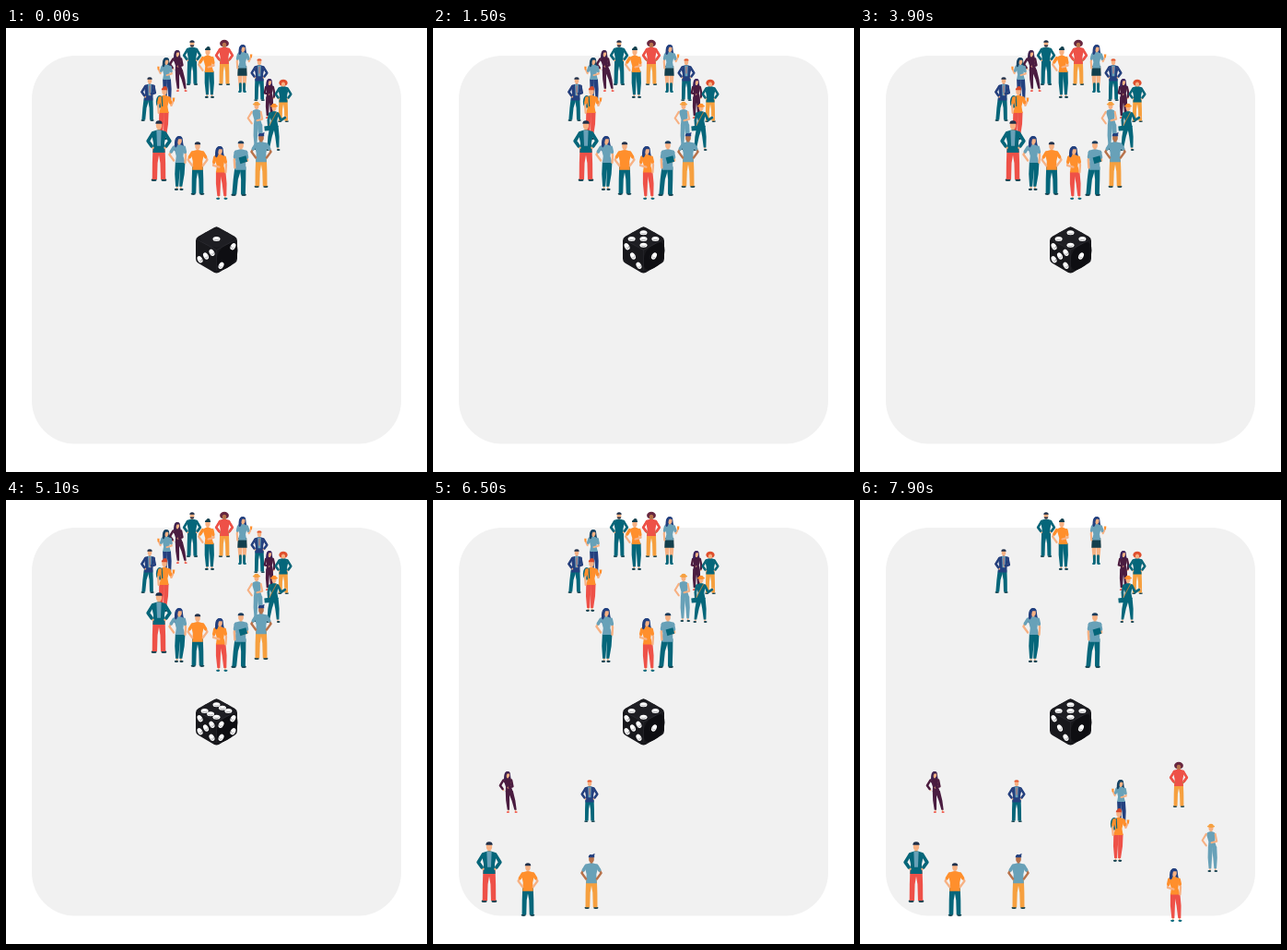
Animation, 457 px wide and 481 px high, one loop 8 s. Source, as an HTML page with a canvas:

```html
<!DOCTYPE html>
<html lang="en">
<head>
<meta charset="utf-8">
<title>Dice and groups</title>
<style>
html, body { margin: 0; width: 100%; height: 100%; overflow: hidden; background: #fff; }
canvas { display: block; }
</style>
</head>
<body>
<canvas id="stage" width="457" height="481"></canvas>
<script>
const ctx = document.getElementById('stage').getContext('2d');

const TEAL = '#05667a', DARK = '#123f4d', BLUE = '#68a1b8', NAVY = '#23407f',
      ORANGE = '#ff8f2c', RED = '#ee5148', YELLOW = '#f6a03f', PURPLE = '#4a1c40',
      INK = '#20304a', SKIN = '#f7b183', BROWN = '#b8724a';

// x: head centre, y: top of the head, h: height; the rest is in hundredths of h
const people = [
  { x: 202, y: 13, h: 49, top: TEAL, legs: TEAL, hair: INK, beard: 1, arms: ['hip', 'hip'], long: 1 },
  { x: 237, y: 13, h: 49, top: RED, legs: YELLOW, hair: '#67263f', style: 'afro', skin: BROWN, arms: ['hip', 'hip'], long: 1, group: 2 },
  { x: 186, y: 24, h: 45, top: PURPLE, legs: PURPLE, hair: '#40234f', style: 'long', arms: ['hip', 'front'], long: 1, feet: [2, 19], sway: 4, shoe: RED, slim: 1, group: 1 },
  { x: 257, y: 18, h: 52, top: BLUE, legs: SKIN, skirt: DARK, hair: NAVY, style: 'long', arms: ['down', 'up'], cup: 1, feet: [-5, 3], sway: -1, shoe: TEAL, boots: 1, slim: 1 },
  { x: 219, y: 21, h: 55, top: ORANGE, legs: TEAL, hair: DARK, style: 'bun', arms: ['hip', 'front'], feet: [-1, 8], sway: 3, slim: 1 },
  { x: 275, y: 33, h: 46, top: NAVY, legs: TEAL, shirt: BLUE, hair: '#e4572e', arms: ['hip', 'hip'], long: 1, group: 1 },
  { x: 174, y: 32, h: 49, top: BLUE, legs: NAVY, hair: '#174363', style: 'long', arms: ['up', 'front'], cup: -1, feet: [-1, 8], sway: 1, slim: 1, group: 2 },
  { x: 286, y: 55, h: 43, top: PURPLE, legs: PURPLE, hair: '#3c235c', style: 'long', arms: ['front', 'down'], long: 1, feet: [-5, 5], shoe: RED, slim: 1 },
  { x: 156, y: 53, h: 48, top: NAVY, legs: TEAL, shirt: BLUE, hair: INK, arms: ['hip', 'front'], long: 1, feet: [-14, 4], sway: -3 },
  { x: 301, y: 56, h: 46, top: TEAL, legs: YELLOW, hair: '#df4e2c', style: 'afro', arms: ['hip', 'hip'], long: 1 },
  { x: 172, y: 64, h: 57, top: ORANGE, legs: RED, hair: '#d94a2b', style: 'bun', pack: 1, arms: ['down', 'up'], cup: 1, feet: [-6, 1], sway: -1, slim: 1, group: 2 },
  { x: 272, y: 80, h: 52, top: BLUE, legs: BLUE, hair: YELLOW, style: 'hat', arms: ['hip', 'front'], bare: 1, feet: [-2, 9], sway: 3, slim: 1, group: 2 },
  { x: 291, y: 82, h: 51, top: TEAL, legs: TEAL, hair: ORANGE, style: 'hat', bag: 1, arms: ['down', 'reach'], long: 1, feet: [-12, 8], slim: 1 },
  { x: 166, y: 100, h: 66, top: TEAL, legs: RED, shirt: BLUE, hair: INK, arms: ['hip', 'hip'], long: 1, group: 1 },
  { x: 277, y: 114, h: 59, top: BLUE, legs: YELLOW, hair: NAVY, style: 'wrap', skin: BROWN, arms: ['hip', 'hip'], group: 1 },
  { x: 188, y: 117, h: 59, top: BLUE, legs: TEAL, hair: NAVY, style: 'long', arms: ['hip', 'down'], feet: [-4, 3], sway: 2, slim: 1 },
  { x: 208, y: 123, h: 58, top: ORANGE, legs: TEAL, hair: INK, arms: ['hip', 'hip'], group: 1 },
  { x: 255, y: 122, h: 60, top: BLUE, legs: TEAL, hair: '#183b5b', folder: 1, arms: ['down', 'front'], feet: [-12, 4], sway: -1 },
  { x: 232, y: 128, h: 58, top: ORANGE, legs: RED, hair: NAVY, style: 'long', arms: ['front', 'down'], feet: [-2, 10], sway: 2, slim: 1, shoe: TEAL, group: 2 }
];

const armPose = {
  hip: [10, 21, 18, 34, 10, 45],
  down: [9, 21, 12, 35, 11, 49],
  up: [9, 21, 13, 35, 17, 26],
  front: [9, 21, 12, 36, 1, 39],
  reach: [8, 21, 15, 35, 26, 28]
};
const shift = { 1: [-105, 270], 2: [109, 271] };

function trace(c, pts) {
  c.beginPath();
  for (let i = 0; i < pts.length; i += 2) c.lineTo(pts[i], pts[i + 1]);
}
function poly(c, color, pts) {
  trace(c, pts);
  c.fillStyle = color;
  c.fill();
}
// closed shape through the midpoints of its corners
function soft(c, color, pts) {
  const n = pts.length;
  const mid = i => (pts[i % n] + pts[(i + 2) % n]) / 2;
  c.beginPath();
  c.moveTo(mid(0), mid(1));
  for (let i = 2; i <= n; i += 2) c.quadraticCurveTo(pts[i % n], pts[(i + 1) % n], mid(i), mid(i + 1));
  c.fillStyle = color;
  c.fill();
}
function oval(c, color, x, y, rx, ry, turn = 0, from = 0, to = 2 * Math.PI) {
  c.fillStyle = color;
  c.beginPath();
  c.ellipse(x, y, rx, ry, turn, from, to);
  c.fill();
}
function line(c, color, width, pts) {
  trace(c, pts);
  c.strokeStyle = color;
  c.lineWidth = width;
  c.stroke();
}

function drawArm(c, p, pose, side) {
  const [ax, ay, bx, by, ex, ey] = armPose[pose].map((v, i) => i % 2 ? v : v * side);
  line(c, p.skin || SKIN, 4, [ax, ay, bx, by, ex, ey]);
  if (p.long) line(c, p.top, 5.5, [ax, ay, bx, by, bx + (ex - bx) * .75, by + (ey - by) * .75]);
  else if (!p.bare) line(c, p.top, 6, [ax, ay, ax + (bx - ax) * .6, ay + (by - ay) * .6]);
}

function drawHead(c, p) {
  const { hair, style, skin = SKIN } = p;
  if (style === 'afro') {
    oval(c, hair, 0, 7.5, 10, 8);
    oval(c, skin, 0, 11, 4.6, 5.5);
    return;
  }
  oval(c, skin, 0, 8.5, 4.8, 6.3);
  if (p.beard) oval(c, hair, 0, 11, 4.6, 4.2, 0, 0, Math.PI);
  if (style === 'hat') {
    oval(c, hair, 0, 5, 8, 2.3);
    oval(c, hair, 0, 3.5, 5.2, 3.8);
    return;
  }
  oval(c, hair, 0, 5.5, 5.6, 5.2, 0, Math.PI, 2 * Math.PI);
  if (style === 'long') soft(c, hair, [3, 1, -1, 4, -3, 10, -3, 20, -9, 22, -8, 2]);
  if (style === 'bun') oval(c, hair, 1, 1.2, 3.6, 3);
  if (style === 'wrap') poly(c, hair, [-5, 4, -3, 0, 1, 1, 6, -2, 5, 5]);
}

// one leg from the hip to the ankle, wide at the thigh
function drawLeg(c, p, side, hip, foot) {
  const sway = p.sway || 0, shoe = p.shoe || DARK;
  const cuff = p.slim ? 2.6 : 4, ankle = p.slim ? 93 : 97;
  const knee = (sway + side * hip * .5 + foot) / 2;
  line(c, p.skin || SKIN, 2.5, [foot, 90, foot, 97]);
  oval(c, shoe, foot + side * 1.2, 98, p.slim ? 3.6 : 4.6, 2);
  poly(c, p.legs, [
    sway + side * hip, 47, knee + side * 4.8, 70, foot + side * cuff, ankle,
    foot - side * cuff, ankle, knee - side * 3.8, 70, sway - side * .4, 55, sway - side * .4, 47
  ]);
  if (p.boots) line(c, shoe, 5.5, [foot, 82, foot, 96]);
}

function drawPerson(c, p) {
  const [fl, fr] = p.feet || [-7, 7];
  const sway = p.sway || 0;
  const shoulder = p.slim ? 9.5 : 12.5, waist = p.slim ? 6.5 : 9, hip = p.slim ? 9 : 10;
  c.lineJoin = c.lineCap = 'round';
  if (p.pack) oval(c, TEAL, -9, 28, 7, 12);
  if (p.style === 'long') soft(c, p.hair, [-6, 0, 6, 0, 7, 14, 10, 24, 3, 29, -6, 29, -12, 24, -7, 14]);

  drawLeg(c, p, 1, hip, fr);
  drawLeg(c, p, -1, hip, fl);
  if (p.skirt) poly(c, p.skirt, [sway - hip, 44, sway + hip, 44, sway + hip + 1, 65, sway - hip - 1, 65]);

  line(c, p.skin || SKIN, 4.5, [0, 12, 0, 19]);
  const hem = p.slim ? 49 : 53;
  poly(c, p.top, [
    -3, 16, 3, 16, shoulder - 2, 18, shoulder, 21, sway / 2 + waist, 37, sway + hip, hem,
    sway - hip, hem, sway / 2 - waist, 37, -shoulder, 21, 2 - shoulder, 18
  ]);
  if (p.shirt) {
    poly(c, p.shirt, [-4, 16.5, 4, 16.5, 3, 42, -3, 42]);
    if (p.top === NAVY) line(c, RED, 1.5, [0, 20, 0, 35]);
  }
  if (p.pack) line(c, TEAL, 2, [-5, 18, -4, 36]);
  p.arms.forEach((pose, i) => drawArm(c, p, pose, i ? 1 : -1));
  if (p.folder) poly(c, TEAL, [-4, 31, 9, 27, 12, 38, -1, 42]);
  if (p.bag) {
    line(c, ORANGE, 1.3, [5, 18, -11, 48]);
    poly(c, TEAL, [-21, 48, -7, 46, -6, 57, -20, 58]);
  }
  if (p.cup) poly(c, ORANGE, [p.cup * 15, 20, p.cup * 20, 20, p.cup * 19, 27, p.cup * 16, 27]);
  drawHead(c, p);
}

const PAD = 30;
for (const p of people) {
  p.sprite = document.createElement('canvas');
  p.sprite.width = 2 * PAD;
  p.sprite.height = p.h + 10;
  const c = p.sprite.getContext('2d');
  c.translate(PAD, 4);
  c.scale(p.h / 100, p.h / 100);
  drawPerson(c, p);
}

// die faces: [top, left, right]
const A = .22, M = .5, Z = .78;
const spots = {
  1: [[M, M]],
  2: [[Z, A], [A, Z]],
  3: [[A, A], [M, M], [Z, Z]],
  4: [[A, A], [A, Z], [Z, A], [Z, Z]],
  5: [[A, A], [A, Z], [M, M], [Z, A], [Z, Z]],
  6: [[A, A], [M, A], [Z, A], [A, Z], [M, Z], [Z, Z]]
};
const sides = [
  { o: [228.5, 216.5], u: [23, 12], v: [-23, 12], rx: 4, ry: 2.5, turn: 0 },
  { o: [205.5, 228.5], u: [23, 12], v: [0, 25], rx: 2.6, ry: 3.9, turn: -.5 },
  { o: [228.5, 240.5], u: [23, -12], v: [0, 25], rx: 2.6, ry: 3.9, turn: .5 }
];
const ONE = [1, 3, 2], FOUR = [4, 5, 1], FIVE = [5, 3, 1], SIX = [6, 5, 4];

function drawPip(s, u, v) {
  const x = s.o[0] + s.u[0] * u + s.v[0] * v;
  const y = s.o[1] + s.u[1] * u + s.v[1] * v;
  oval(ctx, '#fff', x, y, s.rx, s.ry, s.turn);
  ctx.strokeStyle = '#77777d';
  ctx.lineWidth = .6;
  ctx.beginPath();
  ctx.ellipse(x, y - .4, s.rx * .7, s.ry * .65, s.turn, .5, Math.PI - .5);
  ctx.stroke();
}

function drawDie(face, alpha) {
  ctx.globalAlpha = alpha;
  ctx.lineJoin = ctx.lineCap = 'round';
  const hex = [228.5, 221, 245.5, 230.5, 245.5, 250, 228.5, 260, 211.5, 250, 211.5, 230.5];
  poly(ctx, '#18181c', hex);
  line(ctx, '#18181c', 11, hex.concat(hex.slice(0, 2)));
  soft(ctx, '#0e0e12', [228.5, 240.5, 251.5, 228, 251.5, 254, 228.5, 266]);
  soft(ctx, '#1e1e23', [228.5, 215, 252, 228, 228.5, 241, 205, 228]);
  line(ctx, '#2b2b31', .8, [209, 230, 228.5, 240.5, 248, 230]);
  line(ctx, '#25252a', .8, [228.5, 241, 228.5, 262]);
  sides.forEach((s, i) => {
    // the left three lies on the other diagonal when one is on top
    const flip = i === 1 && face === ONE;
    for (const [u, v] of spots[face[i]]) drawPip(s, u, flip ? 1 - v : v);
  });
  ctx.globalAlpha = 1;
}

const LOOP = 8000, STEP = 100;
const rolls = [
  { at: 100, steps: 3, face: SIX },
  { at: 1300, steps: 3, face: FIVE },
  { at: 2500, steps: 3, face: ONE },
  { at: 3700, steps: 3, face: FOUR },
  { at: 4900, steps: 3, face: SIX },
  { at: 6100, steps: 5, face: FOUR, group: 1 },
  { at: 7500, steps: 5, face: FIVE, group: 2 }
];
const fade = (r, t) => t < r.at ? 0 : Math.min(1, (Math.floor((t - r.at) / STEP) + 1) / r.steps);

function drawSprite(p, dx, dy, alpha) {
  if (!alpha) return;
  ctx.globalAlpha = alpha;
  ctx.drawImage(p.sprite, p.x - PAD + dx, p.y - 4 + dy);
  ctx.globalAlpha = 1;
}

function render(t) {
  ctx.fillStyle = '#fff';
  ctx.fillRect(0, 0, 457, 481);
  ctx.fillStyle = '#f1f1f1';
  ctx.beginPath();
  ctx.roundRect(28, 30, 401, 420.5, 47);
  ctx.fill();

  const moved = { 1: 0, 2: 0 };
  let from = ONE, to = ONE, mix = 1;
  for (const r of rolls) {
    const a = fade(r, t);
    if (!a) break;
    from = to;
    to = r.face;
    mix = a;
    if (r.group) moved[r.group] = a;
  }
  for (const p of people) {
    const a = moved[p.group] || 0;
    drawSprite(p, 0, 0, 1 - a);
    if (a) drawSprite(p, ...shift[p.group], a);
  }
  if (mix < 1) drawDie(from, 1);
  drawDie(to, mix);
}

function tick() {
  render(performance.now() % LOOP);
  requestAnimationFrame(tick);
}
tick();
</script>
</body>
</html>
```
